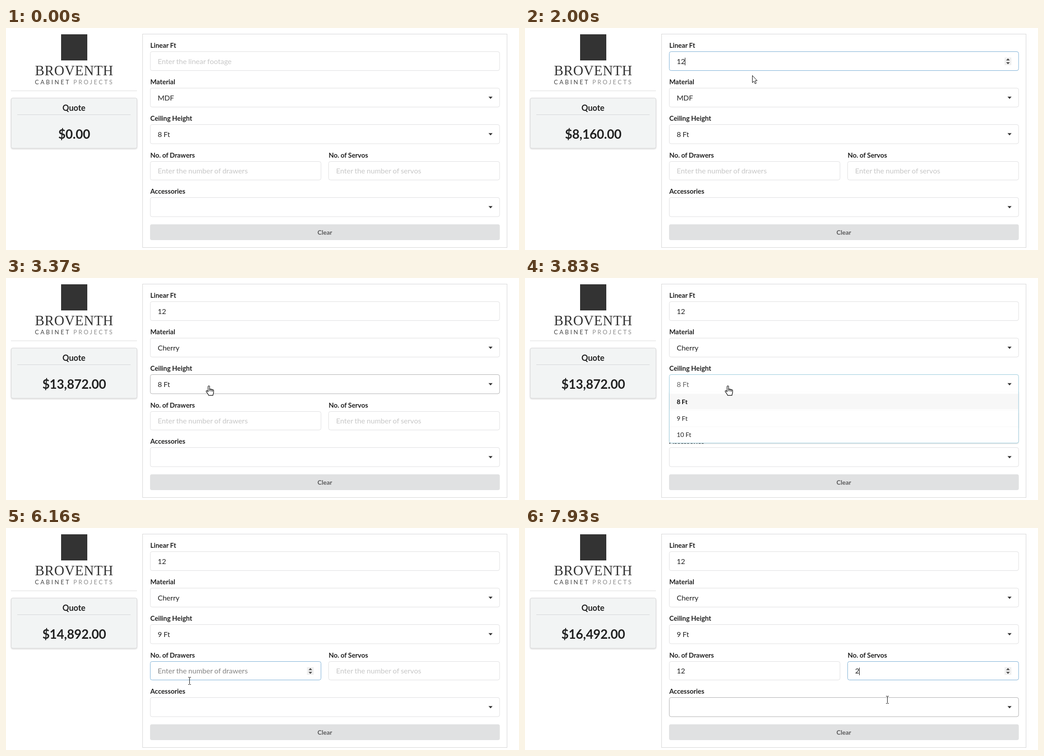
Write an HTML page that moves like this. It is 1136 px wide and 493 px high and loops after 8 s.

```html
<!DOCTYPE html>
<html lang="en">
<head>
<meta charset="utf-8">
<title>Quote form</title>
<style>
  html, body { margin: 0; width: 100%; height: 100%; overflow: hidden; background: #fff; }
  svg { display: block; width: 100%; height: 100%; }
  text { font-family: Lato, sans-serif; font-size: 16px; word-spacing: -.03em; fill: #212121; white-space: pre; }
  .label { font-size: 14.86px; font-weight: 700; }
  .item { font-size: 14px; }
  .bold { font-weight: 700; }
  .mid { text-anchor: middle; }
  .price { font-size: 28px; letter-spacing: -.22px; }
</style>
</head>
<body>
<svg id="stage" viewBox="0 0 1136 493" xmlns="http://www.w3.org/2000/svg">
  <defs>
    <filter id="soft" x="-5%" y="-5%" width="110%" height="115%">
      <feDropShadow dx="0" dy="1.5" stdDeviation="1.2" flood-color="#222426" flood-opacity=".18"/>
    </filter>
  </defs>
  <rect width="1136" height="493" fill="#fff"/>
  <rect x="122" y="14" width="58" height="58" fill="#333"/>
  <text x="151" y="105" class="mid" style="font-family:'Liberation Serif',serif;font-size:31px;letter-spacing:.6px;fill:#333">BROVENTH</text>
  <text x="64" y="124.5" style="font-size:13px;letter-spacing:3.5px;fill:#444">CABINET <tspan fill="#8c8c8c">PROJECTS</tspan></text>
  <path d="M11 139.5H290" stroke="#dcdcdd"/>
  <rect x="11.5" y="155.5" width="278.5" height="111.5" rx="3.5" fill="#f2f4f4" stroke="#d4d4d5" filter="url(#soft)"/>
  <path d="M25 192.5H276" stroke="#d4d6d7"/>
  <text x="150.5" y="184" class="mid bold" style="font-size:18px">Quote</text>
  <rect x="302.5" y="13.5" width="807" height="474" fill="#fff" stroke="#d4d4d5"/>
  <rect x="319" y="436" width="774.5" height="35" rx="4" fill="#e0e1e2"/>
  <text x="706" y="458.5" class="mid bold" style="font-size:14px;fill:#5a5a5b">Clear</text>
  <g id="live"></g>
</svg>
<script>
const LOOP = 8000;
const live = document.getElementById('live');

const fields = [
  { id: 'linear', label: 'Linear Ft', x: 319.5, y: 52.5, w: 773.5, h: 42, hint: 'Enter the linear footage',
    keys: [[1510, '1'], [1800, '12']], focus: [1040, 2350] },
  { id: 'material', label: 'Material', x: 319.5, y: 133.5, w: 773.5, h: 42, items: ['MDF', 'Maple', 'Cherry', 'Walnut'],
    pick: 'Cherry', focus: [2350, 3280] },
  { id: 'ceiling', label: 'Ceiling Height', x: 319.5, y: 214.5, w: 773.5, h: 42.5, items: ['8 Ft', '9 Ft', '10 Ft'],
    pick: '9 Ft', focus: [3750, 4580] },
  { id: 'drawers', label: 'No. of Drawers', x: 319.5, y: 296.5, w: 378, h: 41, hint: 'Enter the number of drawers',
    keys: [[6260, '1'], [6350, '12']], focus: [5240, 6820] },
  { id: 'servos', label: 'No. of Servos', x: 714.5, y: 296.5, w: 378.5, h: 41, hint: 'Enter the number of servos',
    keys: [[7570, '2']], focus: [6820, LOOP] },
  { id: 'extras', label: 'Accessories', x: 319.5, y: 376.5, w: 773.5, h: 42.5, items: [], search: true },
];

// Pointer moves: start, steps, end, then the place reached.
const moves = [
  [190, 1, 190, 560, 412], [280, 8, 940, 508, 71],
  [1890, 2, 2000, 503, 105], [2080, 4, 2350, 487, 160],
  [2720, 1, 2720, 473, 197], [2810, 2, 2900, 444, 241], [3080, 1, 3080, 449, 239],
  [4210, 4, 4490, 430, 300], [4670, 4, 4950, 396, 334],
  [5050, 1, 5050, 398, 338.5], [5150, 1, 5150, 400, 331],
  [5510, 2, 5600, 404, 345], [5690, 2, 5780, 405, 335], [6160, 1, 6160, 406, 337],
  [6440, 2, 6540, 520, 343], [6630, 2, 6720, 1024, 335],
  [7190, 3, 7390, 900, 333], [7840, 2, 7930, 802, 379],
];
const hidden = [[0, 190], [1510, 1890], [6260, 6440], [7570, 7840]];

const within = (t, span) => !!span && t >= span[0] && t < span[1];
const tag = (x, y, s, cls = '', fill = '#212121') =>
  `<text x="${x}" y="${y}" class="${cls}" style="fill:${fill}">${s}</text>`;

function pointerAt(t) {
  let x = 560, y = 600;
  for (const [t0, n, t1, tx, ty] of moves) {
    if (t < t0) break;
    const gap = n > 1 ? (t1 - t0) / (n - 1) : 1;
    const done = Math.min(n, Math.floor((t - t0) / gap + 1.001)) / n;
    x += (tx - x) * done;
    y += (ty - y) * done;
  }
  return { x, y };
}

function valueOf(f, t) {
  if (f.keys) return f.keys.reduce((v, [at, s]) => t >= at ? s : v, '');
  if (!f.focus) return '';
  return t >= f.focus[1] ? f.pick : f.items[0];
}

function quoteAt(t) {
  const v = Object.fromEntries(fields.map(f => [f.id, valueOf(f, t)]));
  const foot = (v.material === 'Cherry' ? 1156 : 680) + (v.ceiling === '9 Ft' ? 85 : 0);
  const sum = v.linear * foot + v.drawers * 50 + v.servos * 500;
  return '$' + sum.toLocaleString('en-US', { minimumFractionDigits: 2 });
}

const hits = (f, p) => p.x >= f.x && p.x <= f.x + f.w && p.y >= f.y && p.y <= f.y + f.h;

function drawSpinner(x, y) {
  return `<rect x="${x - 7.5}" y="${y - 8.5}" width="15" height="17" fill="#efefef"/>` +
    `<path d="M${x - 4} ${y - 2}h8l-4-4.5zM${x - 4} ${y + 2}h8l-4 4.5z" fill="#484848"/>`;
}

function drawField(f, t, p) {
  const on = within(t, f.focus), hover = hits(f, p), value = valueOf(f, t);
  const tx = f.x + 16.5, mid = f.y + f.h / 2, base = Math.round(mid + 6);
  const edge = on ? (f.keys ? '#78add4' : '#96c8da') : f.items && hover ? '#adadae' : '#dededf';
  let s = tag(f.x, Math.round(f.y - 8.6), f.label, 'label') +
    `<rect x="${f.x}" y="${f.y}" width="${f.w}" height="${f.h}" rx="4" fill="#fff" stroke="${edge}"/>`;
  if (f.items) {
    s += tag(tx, base, value, '', on ? '#666' : '#212121');
    return s + `<path d="M1068.5 ${Math.ceil(mid) - 2.5}h9l-4.5 5z" fill="#333"/>`;
  }
  s += value ? tag(tx, base, value) : tag(tx, base, f.hint, '', on ? '#858585' : '#c7c7c7');
  if (on || hover) s += drawSpinner(f.x + f.w - 23.5, mid + .5);
  if (on) {
    const last = f.keys.reduce((a, [at]) => t >= at ? at : a, f.focus[0]);
    if ((t - last) % 1000 < 500)
      s += `<rect x="${Math.floor(tx + value.length * 9.28)}" y="${Math.floor(mid) - 7}" width="1" height="17" fill="#000"/>`;
  }
  return s;
}

function drawMenu(f, p) {
  const row = 36.5, top = f.y + f.h, b = top + row * f.items.length, r = f.x + f.w;
  const edge = `M${f.x} ${top - 4}V${b - 4}q0 4 4 4H${r - 4}q4 0 4 -4V${top - 4}`;
  let s = `<path d="${edge}" fill="#fff" filter="url(#soft)"/>`;
  f.items.forEach((name, i) => {
    const y = top + i * row, hover = Math.floor((p.y + 12 - top) / row) === i;
    const fill = i === 0 ? '#f7f7f7' : hover ? '#f4f4f4' : '#fff';
    s += `<rect x="${f.x + .5}" y="${y}" width="${f.w - 1}" height="${row - 2}" fill="${fill}"/>`;
    if (i) s += `<path d="M${f.x + .5} ${Math.floor(y) + .5}h${f.w - 1}" stroke="#f8f8f8"/>`;
    s += tag(f.x + 16.5, y + 23, name, i ? 'item' : 'item bold', hover || !i ? '#0d0d0d' : '#212121');
  });
  return s + `<path d="${edge}" fill="none" stroke="#96c8da"/>`;
}

const shapes = {
  arrow: '<path d="M.5.5V16.3L4 13l2.5 5.8 2.6-1.1L6.6 12h4.6z" fill="#fff" stroke="#000" stroke-linejoin="round"/>',
  hand: '<path d="M-1.5 13.5V2.2a1.7 1.7 0 0 1 3.4 0V8.5c.3-1.3 3-1.3 3.2.3.6-1 2.7-.8 3 .7.9-.8 2.6-.3 2.6 1.5v4.5c0 2-1.4 3-1.4 6.2H-.2c0-2.4-4.3-5.8-5.4-8.7-.5-1.5 1.3-2.5 2.5-1.3z' +
    'M1.9 8.5v4M5.1 8.8v4M8.1 9.5v4" fill="#fff" stroke="#000" stroke-width="1.2" stroke-linejoin="round"/>',
  beam: '<path d="M-2.5-5.5H0M1-5.5h2.5M.5-5V9.5M-2.5 10.5H0M1 10.5h2.5" fill="none" stroke="#000"/>',
};

function drawPointer(p, open) {
  const f = fields.find(f => hits(f, p));
  const kind = open ? 'hand' : !f ? 'arrow' : f.keys || f.search ? 'beam' : 'hand';
  return `<g transform="translate(${Math.round(p.x)} ${Math.round(p.y)})">${shapes[kind]}</g>`;
}

function scene(t) {
  const p = pointerAt(t);
  const open = fields.find(f => f.items && within(t, f.focus));
  let s = tag(151, 245.5, quoteAt(t), 'mid bold price');
  s += fields.map(f => drawField(f, t, p)).join('');
  if (open) s += drawMenu(open, p);
  if (!hidden.some(h => within(t, h))) s += drawPointer(p, open);
  return s;
}

let shown = '';
function frame(now) {
  const next = scene(now % LOOP);
  if (next !== shown) live.innerHTML = shown = next;
  requestAnimationFrame(frame);
}
frame(performance.now());
</script>
</body>
</html>
```
